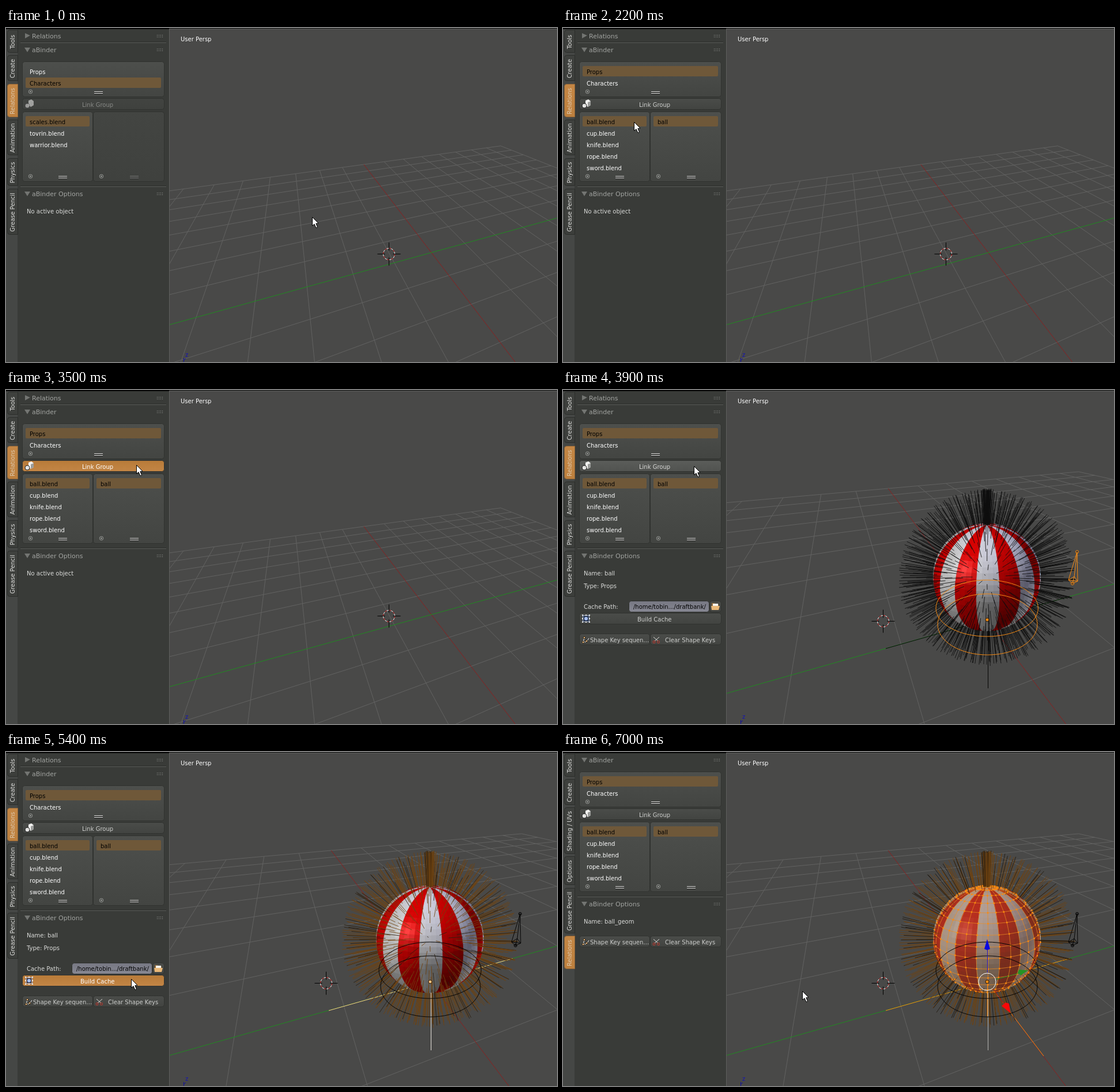
Animation of 956x580 px, one loop 8 s. Source, as an HTML page with a canvas:

```html
<!DOCTYPE html>
<html lang="en">
<head>
<meta charset="utf-8">
<title>Group linking panel</title>
<style>
html, body { margin: 0; width: 100%; height: 100%; overflow: hidden; background: #494948; }
canvas { display: block; }
</style>
</head>
<body>
<canvas id="stage" width="956" height="580"></canvas>
<script>
const W = 956, H = 580, LOOP = 8000, TAU = Math.PI * 2;
const ctx = document.getElementById('stage').getContext('2d');
const FONT = '"DejaVu Sans", sans-serif';
const EMPTY = 0, LINKED = 1, ACTIVE = 2, GEOMETRY = 3, EDIT = 4;

// Each step overrides part of the state from its time on.
const steps = [
  [0, { mouse: [531, 328], category: 1, grouped: false, link: 'off', build: 'on', view: EMPTY }],
  [300, { mouse: [345, 166] }],
  [400, { mouse: [237, 72] }],
  [800, { mouse: [223, 74], category: 0 }],
  [1600, { mouse: [203, 98] }],
  [1700, { mouse: [150, 146] }],
  [1800, { mouse: [123, 163] }],
  [2200, { grouped: true, link: 'on' }],
  [3000, { mouse: [172, 150] }],
  [3100, { mouse: [226, 131], link: 'hover' }],
  [3500, { mouse: [226, 130], link: 'down' }],
  [3900, { mouse: [227, 132], link: 'hover', view: LINKED }],
  [4000, { view: ACTIVE }],
  [4800, { mouse: [220, 201], link: 'on' }],
  [4900, { mouse: [218, 318] }],
  [5000, { mouse: [217, 394], build: 'hover' }],
  [5400, { build: 'down' }],
  [6200, { build: 'on', view: GEOMETRY }],
  [7000, { mouse: [415, 415], view: EDIT }]
];

function stateAt(t) {
  const state = {};
  for (const [start, change] of steps) if (start <= t) Object.assign(state, change);
  return state;
}

function path(g, points, close) {
  g.beginPath();
  points.forEach(([x, y], i) => i ? g.lineTo(x, y) : g.moveTo(x, y));
  if (close) g.closePath();
}
function line(g, color, ...points) {
  path(g, points);
  g.strokeStyle = color;
  g.lineWidth = 1;
  g.stroke();
}
function poly(g, color, ...points) {
  path(g, points, true);
  g.fillStyle = color;
  g.fill();
}
function oval(g, x, y, rx, ry, stroke, fill) {
  g.beginPath();
  g.ellipse(x, y, rx, ry, 0, 0, TAU);
  if (fill) { g.fillStyle = fill; g.fill(); }
  if (stroke) { g.strokeStyle = stroke; g.lineWidth = 1; g.stroke(); }
}
function rect(g, color, x, y, w, h) {
  g.fillStyle = color;
  g.fillRect(x, y, w, h);
}
function text(g, label, x, y, color, size = 10, align = 'left') {
  g.font = `${size}px ${FONT}`;
  g.textAlign = align;
  g.fillStyle = color;
  g.fillText(label, x, y + 4);
}

/* ---------- viewport ---------- */

// Ground plane seen in perspective: origin, the two vanishing points and the depth per cell.
const planes = [
  { o: [738, 390], vx: [483, 57], vy: [1946, 57], p: .10625, q: .0505, cursor: [665, 393] },
  { o: [736, 399], vx: [470, 46], vy: [1985, 46], p: .228, q: .107, cursor: [556, 402] }
];

function drawGrid(g, { o, vx, vy, p, q }) {
  const at = (i, j) => [0, 1].map(k => (o[k] + p * i * vx[k] + q * j * vy[k]) / (1 + p * i + q * j));
  const near = .03, size = 8;
  const alongY = (i, color) => line(g, color, at(i, Math.max(-size, (near - 1 - p * i) / q)), at(i, size));
  const alongX = (j, color) => line(g, color, at(Math.max(-size, (near - 1 - q * j) / p), j), at(size, j));
  for (let n = -size; n <= size; n++) if (n) {
    alongY(n, '#626261');
    alongX(n, '#626261');
  }
  alongX(0, '#8a2020');
  alongY(0, '#208a20');
}

function drawCrosshair(g, [x, y]) {
  const cx = x - .5, cy = y - .5;
  for (let i = 0; i < 16; i++) {
    g.beginPath();
    g.arc(cx, cy, 10, i * TAU / 16, (i + 1) * TAU / 16);
    g.strokeStyle = i % 2 ? '#fff' : '#e02020';
    g.lineWidth = 1;
    g.stroke();
  }
  for (const s of [-1, 1]) {
    line(g, '#000', [cx + s * 7, cy], [cx + s * 20, cy]);
    line(g, '#000', [cx, cy + s * 6], [cx, cy + s * 20]);
  }
}

const BALL = { x: 735.5, y: 325, r: 92.3, distance: 8, tilt: .33, turn: .02 };

function onBall(lat, lon, r = 1) {
  const a = lon + BALL.turn;
  const x = r * Math.cos(lat) * Math.sin(a), y = r * Math.sin(lat), z = r * Math.cos(lat) * Math.cos(a);
  const c = Math.cos(BALL.tilt), s = Math.sin(BALL.tilt);
  return [x, y * c - z * s, y * s + z * c];
}
function project([x, y, z]) {
  const k = BALL.r * BALL.distance / (BALL.distance - z);
  return [BALL.x + x * k, BALL.y - y * k];
}
const dot = (a, b) => a[0] * b[0] + a[1] * b[1] + a[2] * b[2];

const lights = [
  { dir: [-.685, .23, .691], color: [.8, .8, .8] },
  { dir: [.747, .584, .315], color: [.498, .5, .6] },
  { dir: [.434, -.789, -.434], color: [.6, .6, .6] }
];
const halfway = [-.372, .125, .919];

function shade(n, base) {
  const shine = .26 * Math.max(0, dot(n, halfway)) ** 60;
  const rgb = base.map((b, k) => {
    const lit = lights.reduce((sum, l) => sum + Math.max(0, dot(n, l.dir)) * l.color[k], 0);
    return Math.round(255 * Math.min(1, b * lit + shine));
  });
  return `rgb(${rgb})`;
}

function drawBall(g) {
  const cols = 64, rows = 32, dLon = TAU / cols, dLat = Math.PI / rows;
  for (let i = 0; i < cols; i++) for (let j = 0; j < rows; j++) {
    const lon = i * dLon, lat = j * dLat - Math.PI / 2;
    const n = onBall(lat + dLat / 2, lon + dLon / 2);
    if (n[2] < .04) continue;
    const white = Math.floor((lon + dLon / 2) / (TAU / 16) + .5) % 2 === 0;
    const color = shade(n, white ? [.94, .94, .94] : [.97, .01, .01]);
    const corners = [[0, 0], [1, 0], [1, 1], [0, 1]]
      .map(([a, b]) => project(onBall(lat + b * dLat, lon + a * dLon)));
    poly(g, color, ...corners);
    g.strokeStyle = color;
    g.lineWidth = .8;
    g.stroke();
  }
}

function drawWire(g) {
  oval(g, BALL.x, BALL.y, 93, 93, null, 'rgba(142,98,62,.45)');
  const at = (i, j) => onBall(j * Math.PI / 16 - Math.PI / 2, i * TAU / 32);
  const edge = (a, b) => {
    if (a[2] > .1 && b[2] > .1) line(g, 'rgba(235,140,35,.7)', project(a), project(b));
  };
  for (let i = 0; i < 32; i++) for (let j = 1; j < 16; j++) {
    const a = at(i, j);
    edge(a, at(i + 1, j));
    edge(a, at(i, j + 1));
    if (a[2] > .02) {
      const [x, y] = project(a);
      rect(g, '#ff8a0c', x - 1.2, y - 1.2, 2.5, 2.5);
    }
  }
}

function seeded(seed) {
  return () => {
    seed = (seed + 0x6D2B79F5) | 0;
    let v = Math.imul(seed ^ (seed >>> 15), seed | 1);
    v ^= v + Math.imul(v ^ (v >>> 7), v | 61);
    return ((v ^ (v >>> 14)) >>> 0) / 4294967296;
  };
}

// An even spiral of loosely scattered hairs, with a tight tuft at the pole.
const random = seeded(77);
const HAIRS = 820, TUFT = 36;
const hairs = Array.from({ length: HAIRS + TUFT }, (_, i) => {
  const height = i < HAIRS ? 1 - 2 * (i + random()) / HAIRS : 1 - random() * .0025;
  const lat = Math.asin(height), lon = i * 2.39996 + random() * .08;
  return { root: onBall(lat, lon), tip: onBall(lat, lon, 1.6 + random() * .04), pick: random() };
});

function hairColor(view, { pick, root }) {
  if (view === LINKED) return '#0e0e0d';
  if (view === ACTIVE) return pick < .8 ? '#704310' : '#2c1f10';
  if (view === GEOMETRY) return pick < .48 + root[1] * .3 ? '#a01410' : '#6e4010';
  return pick < .75 ? '#704310' : '#20180f';
}
function drawHairs(g, view, front) {
  for (const hair of hairs) {
    if ((hair.root[2] > .1) !== front) continue;
    if (view === EDIT && hair.root[2] > .55) continue;
    path(g, [project(hair.root), project(hair.tip)]);
    g.strokeStyle = hairColor(view, hair);
    g.lineWidth = .85;
    g.stroke();
  }
}

function drawBone(g, color) {
  const head = [884, 336], tail = [892, 281], ring = [[877, 330], [887, 324], [893, 332]];
  for (const p of ring) line(g, color, head, p, tail);
  line(g, color, ...ring, ring[0]);
  oval(g, ...head, 2.5, 2.5, color, 'rgba(0,0,0,.25)');
  oval(g, ...tail, 2.5, 2.5, color, 'rgba(0,0,0,.25)');
}

function drawGizmo(g) {
  line(g, '#1212d0', [736.5, 384], [736.5, 343]);
  poly(g, '#0808e0', [736, 325], [741, 342], [736, 344], [731, 342]);
  line(g, '#208a20', [751, 395], [792, 384]);
  poly(g, '#259325', [807, 379], [791, 378], [789, 383], [794, 388]);
  line(g, '#a01010', [746, 411], [765, 437]);
  poly(g, '#fb0808', [776, 453], [774, 437], [768, 435], [761, 441]);
  oval(g, 736, 399, 15, 15, '#fff');
}

function drawLinkedObject(g, view) {
  const axis = ['', '#0a0a0a', '#ffc98a', '#f58a14', '#f58a14'][view];
  const rig = view === LINKED ? '#f58a14' : '#050505';
  line(g, axis, [560, 449], [879, 358.5]);
  if (view === EDIT) line(g, axis, [736, 399], [834, 528]);
  drawHairs(g, view, false);
  drawBall(g);
  if (view === EDIT) drawWire(g);
  drawHairs(g, view, true);
  const stem = view === LINKED ? '#050505' : view === ACTIVE ? '#e8e4de' : '#b4b4b2';
  line(g, stem, [737.5, 418], [737.5, 518]);
  if (view >= GEOMETRY) line(g, axis, [736.5, 400], [736.5, 459]);
  oval(g, 735.7, 379, 88.7, 49, rig);
  oval(g, 736.5, 407, 86.5, 53, rig);
  drawBone(g, rig);
  if (view === EDIT) drawGizmo(g);
  oval(g, 736, 399, 3, 3, '#2a1a08', view === ACTIVE ? '#ffc07a' : '#f58a14');
}

const scenes = {};
function scene(view) {
  if (scenes[view]) return scenes[view];
  const canvas = document.createElement('canvas');
  canvas.width = W;
  canvas.height = H;
  const g = canvas.getContext('2d');
  const plane = planes[view === EMPTY ? 0 : 1];
  rect(g, '#494948', 0, 0, W, H);
  drawGrid(g, plane);
  if (view !== EMPTY) drawLinkedObject(g, view);
  drawCrosshair(g, plane.cursor);
  line(g, '#1010a0', [308.5, 573], [308.5, 580]);
  line(g, '#1010a0', [309, 576.5], [312, 574]);
  text(g, 'z', 311, 567, '#1414b4');
  text(g, 'User Persp', 303, 19, '#fff');
  return scenes[view] = canvas;
}

/* ---------- side panel ---------- */

// The outline lies just outside the given rectangle.
function bevel(x, y, w, h, top, bottom, radius = 4, outline = '#30322f') {
  const fill = ctx.createLinearGradient(0, y, 0, y + h);
  fill.addColorStop(0, top);
  fill.addColorStop(1, bottom);
  ctx.beginPath();
  ctx.roundRect(x - .5, y - .5, w + 1, h + 1, radius);
  ctx.fillStyle = fill;
  ctx.fill();
  ctx.strokeStyle = outline;
  ctx.lineWidth = 1;
  ctx.stroke();
}

function tabs(edit) {
  rect(ctx, '#454745', 0, 2, 20, H);
  const list = edit
    ? [['Tools', 3, 43], ['Create', 47, 92], ['Shading / UVs', 96, 177], ['Options', 181, 231], ['Grease Pencil', 236, 315], ['Relations', 319, 377]]
    : [['Tools', 3, 43], ['Create', 47, 92], ['Relations', 97, 155], ['Animation', 159, 221], ['Physics', 226, 274], ['Grease Pencil', 279, 359]];
  for (const [label, top, bottom] of list) {
    const active = label === 'Relations';
    const colors = active ? ['#c48644', '#bd803e'] : ['#3f413e', '#3c3e3b'];
    bevel(3, top + 1, 17, bottom - top - 2, ...colors, [4, 0, 0, 4], active ? '#8a6238' : '#2b2d2a');
    ctx.save();
    ctx.translate(11, (top + bottom) / 2 + 1);
    ctx.rotate(-Math.PI / 2);
    text(ctx, label, 0, 0, active ? '#dcc8ae' : '#dededc', 10, 'center');
    ctx.restore();
  }
}

function header(label, y, open) {
  const arrow = open ? [[32, y - 4], [42, y - 4], [37, y + 4]] : [[33, y - 5], [42, y - 1], [33, y + 4]];
  poly(ctx, '#737572', ...arrow);
  text(ctx, label, 45, y, '#a2a4a1', 11);
  for (let i = 0; i < 8; i++) rect(ctx, '#a0a29f', 262 + (i % 4) * 3, y - 2 + (i >> 2) * 3, 1, 1);
}
function separator(y) {
  rect(ctx, '#2b2d2a', 25, y - 1, 253, 1);
  rect(ctx, '#5d5f5c', 25, y, 253, 1);
}

function list(x, y, w, h, items, selected, firstRow, dim) {
  bevel(x, y, w, h, dim ? '#434542' : '#4d4f4c', dim ? '#3f413e' : '#434542');
  items.forEach((label, i) => {
    const cy = firstRow + i * 20, on = i === selected;
    if (on) {
      ctx.beginPath();
      ctx.roundRect(x + 5, cy - 10, w - 10, 18, 2);
      ctx.fillStyle = '#6f5839';
      ctx.fill();
    }
    text(ctx, label, x + 12, cy, on ? '#000' : '#fff');
  });
  const foot = y + h - 9, mid = Math.floor(x + w / 2) + 9;
  const ink = dim ? '#8c8e8b' : '#e6e6e4', ring = '#9a9c99';
  oval(ctx, x + 13.5, foot + .5, 3.2, 3.2, ring);
  rect(ctx, ring, x + 12, foot, 3, 1);
  rect(ctx, ring, x + 13, foot - 1, 1, 3);
  for (const dy of [0, 3]) {
    rect(ctx, '#222', mid - 7, foot + dy + 1, 15, 1);
    rect(ctx, ink, mid - 7, foot + dy, 15, 1);
  }
}

const looks = {
  off: ['#424441', '#3f413e', '#888a87'],
  on: ['#4a4c49', '#424441', '#cfd0ce'],
  hover: ['#5b5d5a', '#515350', '#d8d8d6'],
  down: ['#b87b39', '#c28545', '#fff']
};
function button(label, x, y, w, textX, look) {
  const [top, bottom, ink] = looks[look];
  bevel(x, y, w, 18, top, bottom);
  text(ctx, label, textX, y + 10, ink);
}

function linkIcon(y, dim) {
  ctx.globalAlpha = dim ? .55 : 1;
  poly(ctx, '#f4f4f2', [39, y - 6], [44, y - 8], [48, y - 5], [48, y + 2], [43, y + 5], [39, y + 2]);
  poly(ctx, '#9c9d9b', [48, y - 5], [48, y + 2], [43, y + 5], [43, y - 3]);
  oval(ctx, 37, y + 3, 4, 4, '#222', '#e4e4e2');
  ctx.globalAlpha = 1;
}
function cacheIcon(x, y) {
  ctx.strokeStyle = '#9db2dc';
  ctx.lineWidth = 1;
  ctx.strokeRect(x - 5.5, y - 5.5, 11, 11);
  rect(ctx, '#20345f', x - 4, y - 4, 8, 8);
  oval(ctx, x, y, 3, 3, null, '#a9c0ee');
  for (const dx of [-6, 0, 6]) for (const dy of [-6, 0, 6])
    if (dx || dy) rect(ctx, '#eee', x + dx - 1, y + dy - 1, 2, 2);
}
function folderIcon(y) {
  poly(ctx, '#8d6a3c', [258, y - 6], [263, y - 6], [265, y - 4], [270, y - 4], [270, y + 6], [258, y + 6]);
  rect(ctx, '#f4f2ec', 260, y - 5, 9, 5);
  poly(ctx, '#e9b878', [257, y - 1], [272, y - 1], [270, y + 6], [258, y + 6]);
}

function shapeKeyButtons(y) {
  button('Shape Key sequen…', 29, y, 121, 47, 'on');
  button('Clear Shape Keys', 152, y, 122, 177, 'on');
  const c = y + 10;
  line(ctx, '#eee', [35, c + 4], [37, c - 4]);
  line(ctx, '#eee', [35, c + 4], [41, c + 3], [45, c - 3]);
  for (const [x, dy] of [[35, 4], [37, -4], [41, 2]]) oval(ctx, x, c + dy, 1.7, 1.7, '#3a2a18', '#f0c48c');
  line(ctx, '#d9d9d6', [157, c - 5], [165, c + 2]);
  line(ctx, '#d9d9d6', [167, c - 5], [159, c + 2]);
  oval(ctx, 158, c + 3.5, 2, 2, '#c8342a');
  oval(ctx, 165.5, c + 3.5, 2, 2, '#c8342a');
}

function options(state) {
  const ink = '#dadbd9';
  if (state.view === EMPTY) return text(ctx, 'No active object', 36, 318, ink);
  if (state.view >= GEOMETRY) {
    text(ctx, 'Name: ball_geom', 36, 318, ink);
    return shapeKeyButtons(344);
  }
  text(ctx, 'Name: ball', 36, 318, ink);
  text(ctx, 'Type: Props', 36, 340, ink);
  text(ctx, 'Cache Path:', 36, 376, ink);
  bevel(115, 367, 138, 18, '#777883', '#868792');
  bevel(255, 367, 19, 18, '#4a4c49', '#424441');
  text(ctx, '/home/tobin…/draftbank/', 122, 376, '#000');
  folderIcon(376);
  button('Build Cache', 29, 388, 245, 129, state.build);
  cacheIcon(40, 397);
  shapeKeyButtons(424);
}

const files = [
  ['ball', 'cup', 'knife', 'rope', 'sword'],
  ['scales', 'tovrin', 'warrior']
];

function panel(state) {
  const edit = state.view === EDIT;
  rect(ctx, '#393b38', 0, 0, 283, H);
  rect(ctx, '#5f605e', 283, 0, 1, H);
  tabs(edit);
  ctx.save();
  if (edit) ctx.translate(0, -24);
  else {
    header('Relations', 14, false);
    separator(25);
  }
  header('aBinder', 38, true);
  list(29, 59, 245, 60, ['Props', 'Characters'], state.category, 76, false);
  button('Link Group', 29, 123, 245, 132, state.link);
  linkIcon(132, state.link === 'off');
  list(29, 146, 121, 120, files[state.category].map(name => name + '.blend'), 0, 163, false);
  list(152, 146, 122, 120, state.grouped ? ['ball'] : [], 0, 163, !state.grouped);
  separator(275);
  header('aBinder Options', 288, true);
  options(state);
  ctx.restore();
}

function pointer([x, y]) {
  ctx.save();
  ctx.translate(x + .5, y + .5);
  path(ctx, [[0, 0], [0, 15], [3.5, 12], [6.5, 18.5], [9, 17.5], [6.3, 11], [10.5, 10.5]], true);
  ctx.fillStyle = '#fff';
  ctx.fill();
  ctx.strokeStyle = '#000';
  ctx.lineWidth = 1;
  ctx.stroke();
  ctx.restore();
}

function frame() {
  const state = stateAt(performance.now() % LOOP);
  ctx.drawImage(scene(state.view), 0, 0);
  panel(state);
  rect(ctx, '#050505', 0, 0, W, 2);
  rect(ctx, '#5f605e', 283, 1, W - 283, 1);
  pointer(state.mouse);
  requestAnimationFrame(frame);
}
for (let view = EMPTY; view <= EDIT; view++) scene(view);
frame();
</script>
</body>
</html>
```
